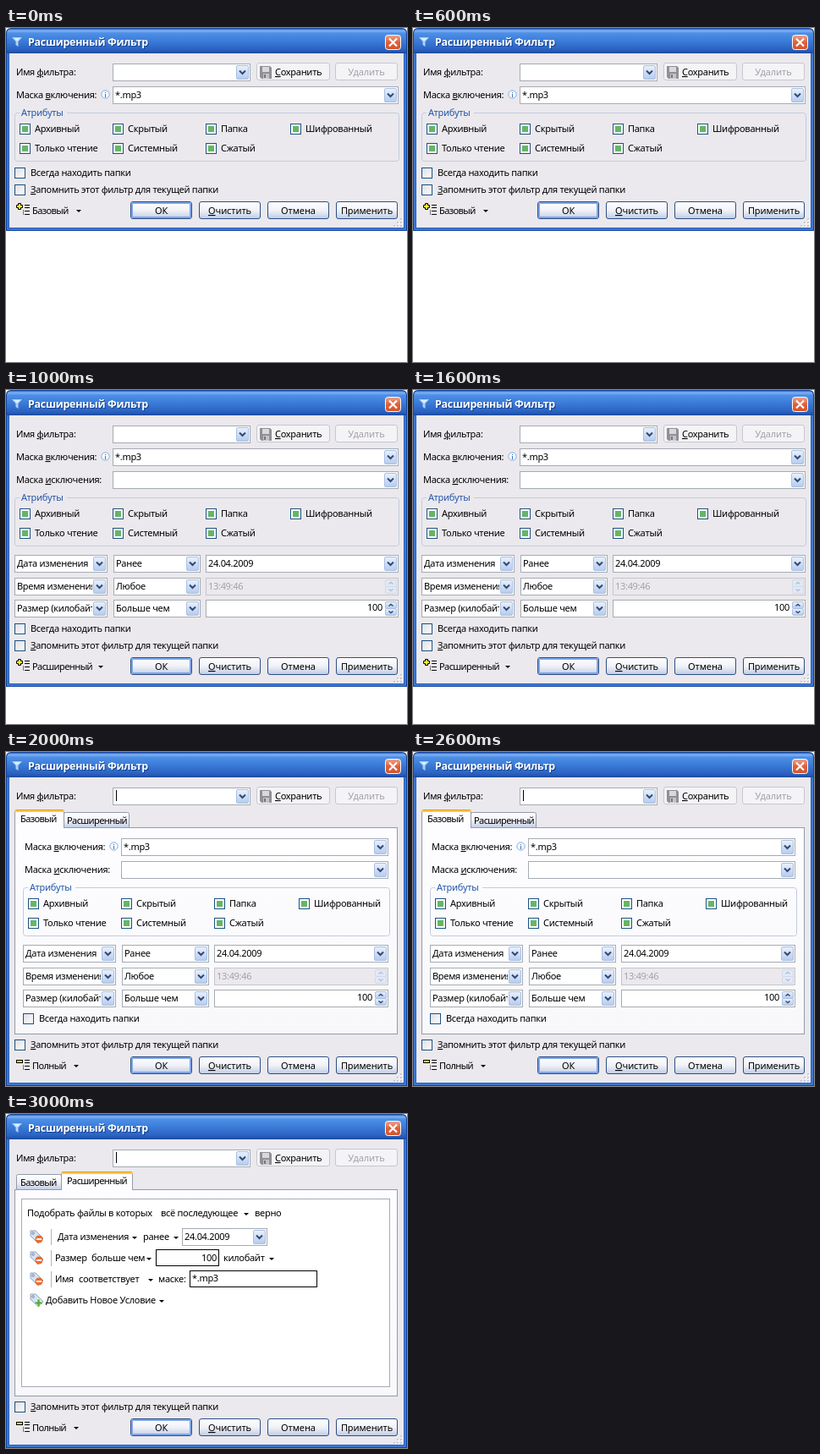
Recreate the animation shown at these times as an HTML page. Size 474 by 395 pixels, loop 4000 ms.

```html
<!DOCTYPE html>
<html lang="ru">
<head>
<meta charset="utf-8">
<title>Расширенный Фильтр</title>
<style>
html, body { margin: 0; width: 100%; height: 100%; overflow: hidden; background: #fff; }
#stage { display: block; width: 474px; height: 395px; }
text { font: 11px "Noto Sans", "Open Sans", sans-serif; letter-spacing: -.3px; white-space: pre; }
text.title { font: bold 12.5px "Noto Sans", "Open Sans", sans-serif; }
text.btn { letter-spacing: -.1px; }
text.tight { letter-spacing: -.6px; }
.u { text-decoration: underline; }
rect { shape-rendering: crispEdges; }
rect[rx] { shape-rendering: auto; }
.view { visibility: hidden; animation: show 4s step-end infinite; }
@keyframes show {
  0% { visibility: visible; }
  25%, 100% { visibility: hidden; }
}
</style>
</head>
<body>
<svg id="stage" viewBox="0 0 474 395">
  <defs>
    <linearGradient id="bar" x2="0" y2="1">
      <stop offset="0" stop-color="#2a64c4"/><stop offset=".07" stop-color="#82b3f3"/>
      <stop offset=".18" stop-color="#4d8fe6"/><stop offset=".5" stop-color="#3b7bd8"/>
      <stop offset=".85" stop-color="#2a62c0"/><stop offset="1" stop-color="#1c4a9f"/>
    </linearGradient>
    <linearGradient id="red" x2="0" y2="1">
      <stop offset="0" stop-color="#f0a58c"/><stop offset=".5" stop-color="#e0603a"/><stop offset="1" stop-color="#d2552c"/>
    </linearGradient>
    <linearGradient id="push" x2="0" y2="1">
      <stop offset="0" stop-color="#fff"/><stop offset=".5" stop-color="#f1f2f8"/><stop offset="1" stop-color="#bfcce4"/>
    </linearGradient>
    <linearGradient id="drop" x2="0" y2="1">
      <stop offset="0" stop-color="#e9f1fd"/><stop offset="1" stop-color="#b5cbee"/>
    </linearGradient>
    <linearGradient id="check" x2="1" y2="1">
      <stop offset="0" stop-color="#dcdce2"/><stop offset="1" stop-color="#fff"/>
    </linearGradient>
    <linearGradient id="page" x2="0" y2="1">
      <stop offset="0" stop-color="#fdfdff"/><stop offset="1" stop-color="#f8f8fb"/>
    </linearGradient>
  </defs>
</svg>
<script>
const FACE = '#ebe9ed', EDGE = '#a5acb2', NAVY = '#2c4f86', ROW = 21;

const fill = (x, y, w, h, c) => `<rect x="${x}" y="${y}" width="${w}" height="${h}" fill="${c}"/>`;
// Box with a one pixel outline inside the given size.
const box = (x, y, w, h, c, line, r) =>
  `<rect x="${x + .5}" y="${y + .5}" width="${w - 1}" height="${h - 1}" fill="${c}" stroke="${line}"${r ? ` rx="${r}"` : ''}/>`;
const path = (d, attrs) => `<path d="${d}" ${attrs}/>`;
const move = (x, y, s) => `<g transform="translate(${x} ${y})">${s}</g>`;
// An ampersand marks the underlined letter.
const text = (x, y, s, attrs = '') =>
  `<text x="${x}" y="${y}" ${attrs}>${s.replace(/&(.)/, '<tspan class="u">$1</tspan>')}</text>`;
const clip = (x, y, w, h, s) => `<svg x="${x}" y="${y}" width="${w}" height="${h}">${s}</svg>`;
const arrow = (x, y) => path(`M${x - 3} ${y - 1}h6l-3 3z`, 'fill="#000"');
const chevron = (x, y) => path(`M${x - 3.5} ${y - 2}l3.5 3.5l3.5 -3.5`, 'fill="none" stroke="#34496f" stroke-width="2"');

function combo(x, y, w, s = '') {
  return box(x, y, w, ROW, '#fff', EDGE) +
    clip(x + 3, y, w - 21, ROW, text(0, 14, s)) +
    box(x + w - 17, y + 2, 15, ROW - 4, 'url(#drop)', '#a9c0e6', 1.5) +
    chevron(x + w - 9.5, y + 10.5);
}

function spinner(x, y, on) {
  const c = on ? '#34496f' : '#aebfdb';
  const half = (t, d) => box(x, t, 14, 9, on ? 'url(#drop)' : '#e3e9f4', on ? '#a9c0e6' : '#d0daea', 1.5) +
    path(`M${x + 4.5} ${t + 4.5 + d}l2.5 ${-2 * d}l2.5 ${2 * d}`, `fill="none" stroke="${c}" stroke-width="1.5"`);
  return half(y, 1) + half(y + 8, -1);
}

function check(x, cy, label, mixed) {
  return box(x, cy - 6, 13, 13, mixed ? '#fff' : 'url(#check)', '#1c5180') +
    (mixed ? fill(x + 3, cy - 3, 7, 7, '#65b665') : '') +
    text(x + (mixed ? 18 : 19), cy + 4, label);
}

function button(x, y, label, main) {
  return box(x, y, 73, ROW, 'url(#push)', NAVY, 2.5) +
    (main ? `<rect x="${x + 2}" y="${y + 2}" width="69" height="17" rx="1.5" fill="none" stroke="#7da5e8" stroke-width="2"/>` : '') +
    text(x + 36.5, y + 15, label, 'class="btn" text-anchor="middle"');
}

function nameRow(caret) {
  const disk = path('M300 45h12l2 2v13h-12l-2 -2z', 'fill="#909095"') +
    fill(303, 46, 8, 6, '#d9d9dd') + fill(304, 54, 7, 6, '#c4c4c8') + fill(305, 55, 2, 4, '#77777c');
  return text(12, 56, 'Имя &фильтра:') + combo(126, 42, 163) +
    (caret ? fill(130, 45, 1, 13, '#000') : '') +
    box(296, 41, 87, ROW, '#f4f3f6', '#c9c7cf', 2.5) + disk + text(318, 56, '&Сохранить') +
    box(389, 41, 74, ROW, '#f4f3f6', '#c9c7cf', 2.5) +
    text(426, 56, 'Удалить', 'class="btn" text-anchor="middle" fill="#a3a1a8"');
}

function maskRow(right) {
  return text(12, 83, 'Маска &включения:') +
    '<circle cx="117.5" cy="78.5" r="4.7" fill="#f4f9ff" stroke="#86addf"/>' +
    fill(117, 76, 1, 1, '#3f74bd') + fill(117, 78, 1, 4, '#3f74bd') +
    combo(126, 69, right - 126, '*.mp3');
}

function attributes(y, w) {
  const cols = [16, 126, 236, 336];
  const rows = [['Архивный', 'Скрытый', 'Папка', 'Шифрованный'], ['Только чтение', 'Системный', 'Сжатый']];
  return move(0, y, box(10, 0, w, 58, 'none', '#c3cbe0', 3) +
    '<rect x="16" width="56" height="1" style="fill:var(--back)"/>' +
    text(18, 4, 'Атрибуты', 'fill="#2455a8"') +
    rows.map((r, j) => r.map((s, i) => check(cols[i], 19 + 23 * j, s, true)).join('')).join(''));
}

// Mask, attribute and comparison controls shared by the wide views.
function conditions(right, group) {
  const pairs = [['Дата изменения', 'Ранее'], ['Время изменения', 'Любое'], ['Размер (килобайт)', 'Больше чем']];
  const tops = [195, 222, 248], w = right - 236;
  return maskRow(right) + text(12, 110, 'Маска &исключения:') + combo(126, 96, right - 126) +
    attributes(127, group) +
    pairs.map(([a, b], i) => combo(10, tops[i], 110, a) + combo(127, tops[i], 103, b)).join('') +
    combo(236, 195, w, '24.04.2009') +
    box(236, 222, w, ROW, FACE, '#c6c4cb') + text(239, 236, '13:49:46', 'fill="#a3a1a8"') + spinner(right - 16, 224, false) +
    box(236, 248, w, ROW, '#fff', EDGE) + text(right - 19, 261, '100', 'text-anchor="end"') + spinner(right - 16, 250, true) +
    check(10, 282, 'Всегда находить папки');
}

const plus = path('M2.5 .5h3v2h2v3h-2v2h-3v-2h-2v-3h2z', 'fill="#ffee32" stroke="#000"');
const minus = box(0, 2, 8, 4, '#ffee32', '#000');
const list = [2, 5, 9, 13].map(y => fill(10, y, 6, 1, '#000')).join('') + fill(8, 8, 1, 6, '#777');
const modes = {
  'Базовый': [plus, 86],
  'Расширенный': [plus, 112],
  'Полный': [minus, 83]
};

function frame(h, mode) {
  const [sign, ax] = modes[mode];
  let grip = '';
  for (let i = 0; i < 3; i++) for (let j = 0; j <= i; j++) {
    const x = 466 - 4 * j, y = h - 15 + 4 * i;
    grip += fill(x + 1, y + 1, 2, 2, '#fff') + fill(x, y, 2, 2, '#cbc8d2');
  }
  return path(`M0 ${h}V6Q0 0 6 0H468Q474 0 474 6V${h}z`, 'fill="#17479f"') +
    path(`M1 ${h - 1}V7Q1 1 7 1H467Q473 1 473 7V${h - 1}z`, 'fill="#3a77d6"') +
    path('M1 30V7Q1 1 7 1H467Q473 1 473 7V30z', 'fill="url(#bar)"') +
    fill(3, 30, 1, h - 33, '#2a62c2') + fill(470, 30, 1, h - 33, '#2a62c2') + fill(3, h - 4, 468, 1, '#2a62c2') +
    fill(4, 30, 466, h - 34, FACE) +
    path('M7 11h12l-4.5 5v6l-3 -2v-4z', 'fill="#a8d1fb"') + path('M9 12h8l-4 3.5z', 'fill="#dceeff"') +
    text(27, 22, 'Расширенный Фильтр', 'class="title" fill="#143f8d"') +
    text(26, 21, 'Расширенный Фильтр', 'class="title" fill="#fff"') +
    box(448, 8, 19, 18, 'url(#red)', '#fff', 3) +
    path('M453 12.5l9 9m0 -9l-9 9', 'stroke="#fff" stroke-width="2.2"') +
    grip +
    check(10, h - 49, '&Запомнить этот фильтр для текущей папки') +
    move(12, h - 33, sign + list) + text(31, h - 20, mode, 'class="tight"') + arrow(ax, h - 24) +
    button(147, h - 35, 'ОК', true) + button(228, h - 35, '&Очистить') +
    button(309, h - 35, 'Отмена') + button(390, h - 35, 'Применить');
}

function tab(x, w, label, tx, on) {
  const y = on ? 68 : 71;
  return path(`M${x + .5} 90V${y + 2.5}q0 -2 2 -2h${w - 5}q2 0 2 2V90`,
    `fill="${on ? '#fdfdff' : 'url(#push)'}" stroke="#919bab"`) +
    (on ? path(`M${x} 71v-1q0 -2 2 -2h${w - 4}q2 0 2 2v1z`, 'fill="#ffc83c"') + fill(x + 2, 68, w - 4, 1, '#e5972d') : '') +
    text(tx, on ? 83 : 85, label, 'class="tight"');
}

function tabs(second) {
  const a = second ? tab(12, 54, 'Базовый', 17, false) : tab(68, 78, 'Расширенный', 72, false);
  const b = second ? tab(65, 85, 'Расширенный', 72, true) : tab(10, 59, 'Базовый', 17, true);
  const gap = second ? fill(66, 89, 83, 1, '#fdfdff') : fill(11, 89, 57, 1, '#fdfdff');
  return a + box(10, 89, 453, 245, 'url(#page)', '#919bab') + b + gap;
}

function tag(y, add) {
  const c = add ? '#58b03c' : '#ee6b2d';
  return move(28, y - 8, path('M1 1h6l9 9l-6 6l-9 -9z', 'fill="#d5e3f2" stroke="#8fa5be"') +
    '<circle cx="4" cy="4" r="1.3" fill="#fff" stroke="#7189a5"/>' +
    (add ? path('M9 7h3v3h3v3h-3v3h-3v-3h-3v-3h3z', `fill="${c}" stroke="#fff" stroke-width=".5"`)
      : `<circle cx="11" cy="11" r="4.5" fill="${c}"/>` + fill(8, 10, 6, 2, '#fff'))) +
    (add ? '' : fill(53, y - 9, 1, 19, '#b5b3bb'));
}

function rules() {
  return box(18, 100, 436, 223, '#fff', EDGE) +
    text(25, 121, 'Подобрать файлы в которых') + text(183, 121, 'всё последующее') + arrow(284, 118) + text(294, 121, 'верно') +
    tag(145) + text(61, 149, 'Дата изменения') + arrow(152, 146) + text(162, 149, 'ранее') + arrow(201, 146) +
    combo(208, 135, 101, '24.04.2009') +
    tag(170) + text(58, 174, 'Размер') + text(101, 174, 'больше чем') + arrow(169, 171) +
    box(177, 160, 75, 20, '#fff', '#000') + text(249, 174, '100', 'text-anchor="end"') +
    text(257, 174, 'килобайт') + arrow(314, 171) +
    tag(195) + text(58, 199, 'Имя') + text(86, 199, 'соответствует') + arrow(171, 196) + text(180, 199, 'маске:') +
    box(217, 185, 151, 20, '#fff', '#000') + text(220, 198, '*.mp3') +
    tag(220, true) + text(47, 224, 'Добавить Новое Условие') + arrow(184, 221);
}

const views = [
  frame(240, 'Базовый') + nameRow() + maskRow(464) + attributes(100, 455) + check(10, 171, 'Всегда находить папки'),
  frame(351, 'Расширенный') + nameRow() + conditions(464, 455),
  frame(395, 'Полный') + nameRow(true) + tabs(false) + move(10, 33, conditions(442, 434)),
  frame(395, 'Полный') + nameRow(true) + tabs(true) + rules()
];

// Negative delays start each later view at its own second of the loop.
document.getElementById('stage').insertAdjacentHTML('beforeend', views.map((v, i) =>
  `<g class="view" style="animation-delay:${i ? i - 4 : 0}s;--back:${i === 2 ? '#fbfbfd' : FACE}">${v}</g>`).join(''));
</script>
</body>
</html>
```
